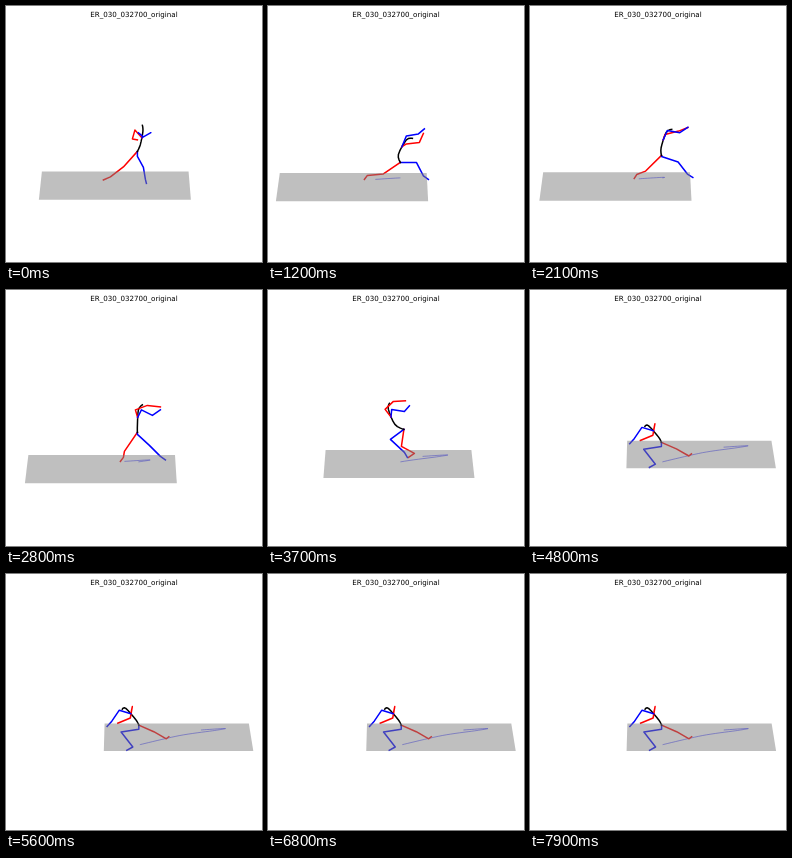
Animation of 256 by 256 pixels, one loop 8000 ms. Source, as an HTML page:

```html
<!DOCTYPE html>
<html>
<head>
<meta charset="utf-8">
<style>
  html, body { margin: 0; width: 100%; height: 100%; overflow: hidden; background: #fff; }
  svg { display: block; width: 100vw; height: 100vh; }
  text { font: 7.12px "DejaVu Sans", sans-serif; text-anchor: middle; }
  polyline { fill: none; stroke-width: 1.5; stroke-linejoin: round; stroke-linecap: square; }
  #trail { stroke: #00f; stroke-width: .5; stroke-linecap: butt; }
</style>
</head>
<body>
<svg viewBox="0 0 256 256">
  <text x="128" y="10.5">ER_030_032700_original</text>
  <g id="scene">
    <polyline id="trail"/>
    <polyline id="rightLeg" stroke="#f00"/>
    <polyline id="leftLeg" stroke="#00f"/>
    <polyline id="spine" stroke="#000"/>
    <polyline id="rightArm" stroke="#f00"/>
    <polyline id="leftArm" stroke="#00f"/>
    <polygon id="floor" fill="#808080" fill-opacity=".5"/>
  </g>
</svg>
<script>
const LOOP = 8000, STEP = 100;
const $ = id => document.getElementById(id);

// Key poses. spine: pelvis, waist, neck, head; legs: knee, ankle, toe; arms: elbow, wrist.
// shoulder: right shoulder relative to the neck, the left one mirrors it.
// hip: drop of the left hip; floor: left edge and top.
const stride = {
  at: 0, floor: [32.5, 165], hip: [5], shoulder: [-8, -1.3],
  spine: [131,145, 134,138, 136.5,125, 136,119],
  rightLeg: [117,160.5, 104,170.5, 97,173.5], leftLeg: [137,161, 139,173, 140,177],
  rightArm: [126,132.5, 131,133.5], leftArm: [137,130.5, 132,126.5]
};
const lunge = {
  at: 1200, floor: [7.5, 166.5], hip: [0], shoulder: [0, 4],
  spine: [132,156, 130,148, 138,133.5, 144,132],
  rightLeg: [115,167.5, 99,169, 96,173], leftLeg: [148,156, 155,169.5, 160,173],
  rightArm: [151,136, 155,127], leftArm: [150,127.5, 156,122.5]
};
const brake = {
  at: 2800, floor: [18.5, 164.5], hip: [2], shoulder: [-3, 0],
  spine: [131,142, 131,135, 132,119.5, 136,114.5],
  rightLeg: [118,161, 117,167, 114,171], leftLeg: [143,155, 154,166, 159,169.5],
  rightArm: [141,115, 154,116.5], leftArm: [146,125, 154,119.5]
};
const turn = {
  at: 3700, floor: [55, 159.5], hip: [0], shoulder: [-3.3, 0],
  spine: [135.5,139, 126.5,134, 120,119, 121,113],
  rightLeg: [133,156, 146,163, 140,167], leftLeg: [122,149, 136,162, 139,167],
  rightArm: [125,111, 137,110.5], leftArm: [136,121, 141,115.5]
};
const crouch = {
  at: 4800, floor: [96, 150.3], hip: [4], shoulder: [6.5, -1.8],
  spine: [131,152, 128,146.5, 118,135.2, 114.5,136],
  rightLeg: [146,158.5, 158.5,165.6, 161,163.5], leftLeg: [113.3,158.8, 125,173.8, 119,177],
  rightArm: [122.5,144.8, 110,150], leftArm: [104,148, 99.3,153.3]
};
const poses = [stride, lunge, brake, turn, crouch];
const times = poses.map(p => p.at);

// Cubic Hermite spline through (xs[i], ys[i]), at rest at both ends.
function spline(xs, ys, x) {
  const last = xs.length - 1;
  x = Math.min(x, xs[last]);
  let i = 0;
  while (i < last - 1 && x >= xs[i + 1]) i++;
  const slope = j => j % last ? (ys[j + 1] - ys[j - 1]) / (xs[j + 1] - xs[j - 1]) : 0;
  const d = xs[i + 1] - xs[i], u = (x - xs[i]) / d, v = 1 - u;
  return v * v * (1 + 2 * u) * ys[i] + u * u * (3 - 2 * u) * ys[i + 1]
    + u * v * d * (v * slope(i) - u * slope(i + 1));
}

const part = (name, t) =>
  stride[name].map((_, k) => spline(times, poses.map(p => p[name][k]), t));
const plot = (id, points) =>
  $(id).setAttribute("points", points.map(n => n.toFixed(2)).join(" "));

// Smooth curve through the four spine joints, four segments per bone.
function bend(joints) {
  const axis = k => [0, 1, 2, 3].map(j => joints[2 * j + k]);
  return Array.from({ length: 26 }, (_, n) =>
    spline([0, 1, 2, 3], axis(n % 2), (n >> 1) / 4));
}

function draw(t) {
  const joints = part("spine", t), spine = bend(joints);
  const [px, py, , , nx, ny] = joints;
  const chest = spine.slice(12, 14);
  const [sx, sy] = part("shoulder", t), [hip] = part("hip", t);
  plot("spine", spine);
  plot("rightLeg", [px, py, ...part("rightLeg", t)]);
  plot("leftLeg", [px, py, px, py + hip, ...part("leftLeg", t)]);
  plot("rightArm", [...chest, nx + sx, ny + sy, ...part("rightArm", t)]);
  plot("leftArm", [...chest, nx - sx, ny - sy, ...part("leftArm", t)]);

  const [left, top] = part("floor", t), rise = top - 165;
  const right = left + 152 + rise * .17, bottom = top + 28.3 + rise * .05;
  const inset = x => x + (118 - x) * .035;
  plot("floor", [left, bottom, inset(left), top, inset(right), top, right, bottom]);

  // The figure stays centred, so its past path drifts along with the floor.
  const trail = [];
  for (let s = 0; s <= t; s += STEP) {
    const [x, y] = part("floor", s), dy = top - y;
    trail.push(132 + (left - x) * (1 + dy * .0025), 171.5 + dy);
  }
  plot("trail", trail);

  // Once crouched, everything sways slowly to the right and back.
  const still = Math.max(0, t - crouch.at);
  const sway = 2 * Math.sin(Math.PI * still / 3200), lift = 1.2 * Math.min(1, still / 800);
  $("scene").setAttribute("transform", `translate(${.4 + sway} ${.4 - lift})`);
}

function tick() {
  draw(Math.floor(performance.now() % LOOP / STEP) * STEP);
  requestAnimationFrame(tick);
}
tick();
</script>
</body>
</html>
```
